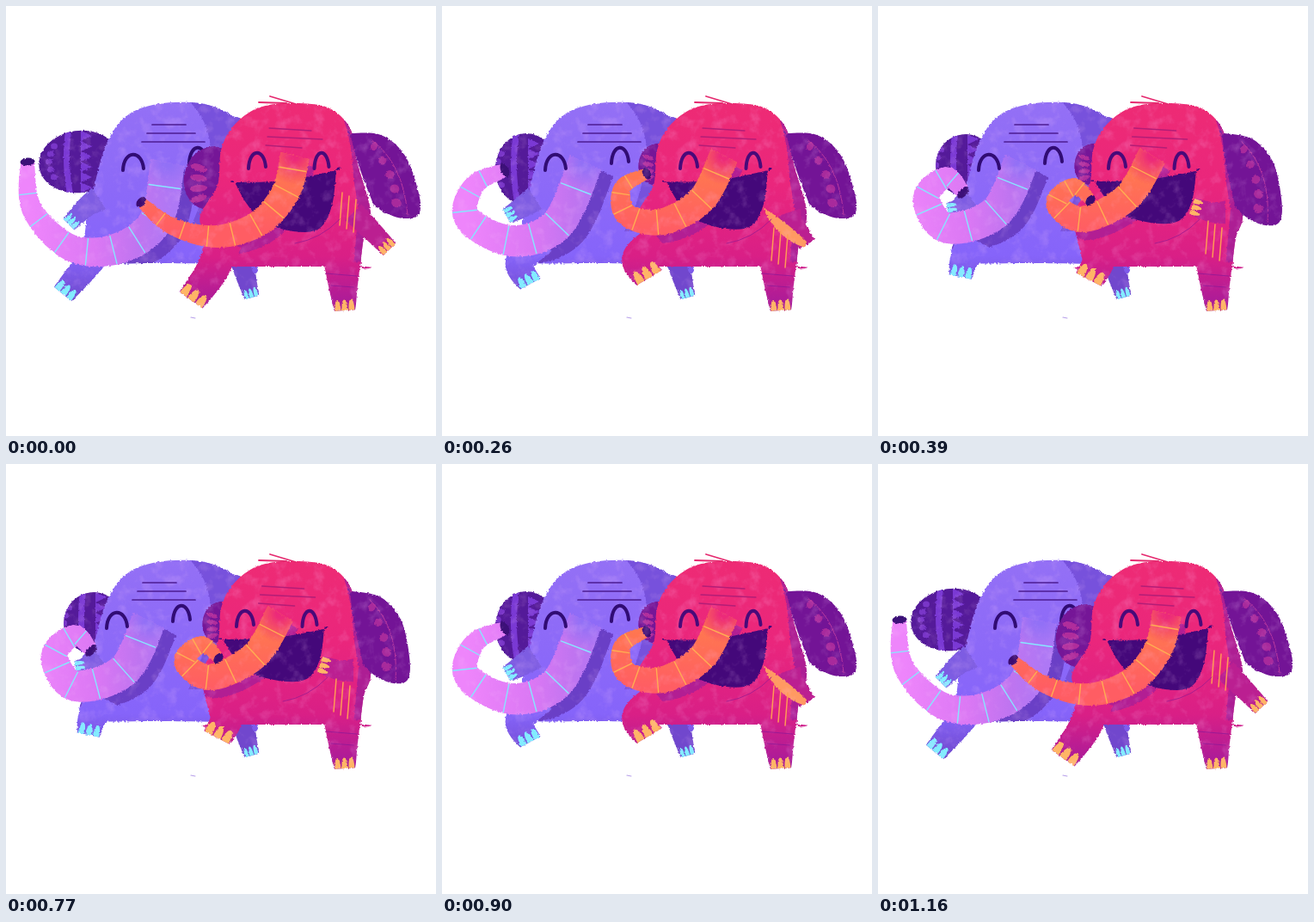
An HTML page for the animation above (1410 ms loop, 500 by 500 pixels).

```html
<!DOCTYPE html>
<html lang="en">
<head>
<meta charset="utf-8">
<title>Dancing elephants</title>
<style>
  html, body { margin: 0; width: 100%; height: 100%; overflow: hidden; background: #fff; }
  svg { display: block; width: 100%; height: 100%; }
</style>
</head>
<body>
<svg viewBox="0 0 500 500">
  <defs>
    <filter id="brush" filterUnits="userSpaceOnUse" x="0" y="0" width="500" height="500" color-interpolation-filters="sRGB">
      <feTurbulence type="fractalNoise" baseFrequency=".4" numOctaves="2" seed="4"/>
      <feColorMatrix values="1 0 0 0 0  0 1 0 0 0  0 0 1 0 0  0 0 0 0 1" result="grain"/>
      <feDisplacementMap in="SourceGraphic" in2="grain" scale="3" xChannelSelector="R" yChannelSelector="G" result="rough"/>
      <feTurbulence type="fractalNoise" baseFrequency=".07" numOctaves="4" seed="9"/>
      <feColorMatrix values="0 0 0 0 1  0 0 0 0 .8  0 0 0 0 1  .5 0 0 0 -.25"/>
      <feComposite in2="rough" operator="in" result="cloud"/>
      <feMerge><feMergeNode in="rough"/><feMergeNode in="cloud"/></feMerge>
    </filter>
    <linearGradient id="violet" gradientUnits="userSpaceOnUse" x1="0" y1="110" x2="0" y2="350">
      <stop offset="0" stop-color="#9470f5"/><stop offset=".75" stop-color="#8664fa"/><stop offset="1" stop-color="#6c45c6"/>
    </linearGradient>
    <linearGradient id="red" gradientUnits="userSpaceOnUse" x1="0" y1="110" x2="0" y2="352">
      <stop offset="0" stop-color="#ee2b74"/><stop offset=".4" stop-color="#ea267c"/>
      <stop offset=".75" stop-color="#d91f86"/><stop offset="1" stop-color="#a51b9b"/>
    </linearGradient>
    <linearGradient id="pink" gradientUnits="userSpaceOnUse" x1="30" y1="0" x2="195" y2="0">
      <stop offset="0" stop-color="#ee85fb"/><stop offset=".45" stop-color="#db78f4"/>
      <stop offset=".75" stop-color="#bf74f0"/><stop offset="1" stop-color="#ae78f5"/>
    </linearGradient>
    <linearGradient id="coral" gradientUnits="userSpaceOnUse" x1="0" y1="180" x2="0" y2="260">
      <stop offset="0" stop-color="#ff7c4c"/><stop offset="1" stop-color="#ff5d63"/>
    </linearGradient>
  </defs>
  <g id="stage"></g>
</svg>
<script>
// Trunks run from tip to base, limbs are knee and foot, ears are centre, radii and turn.
const OUT = {
  violet: {
    face: 0, brow: 0, ear: [85, 181, 47, 36, -8],
    trunk: [[25, 181], [30, 236], [75, 281], [130, 282], [174, 250], [188, 182]],
    leg: [[95, 300], [66, 335]], arm: [[93, 234], [73, 254]]
  },
  red: {
    face: 0, open: 1, lean: 0, swing: 0, marks: [391, 217], ear: [238, 200], earSize: 1,
    trunk: [[157, 228], [193, 256], [245, 268], [295, 252], [326, 215], [336, 174]],
    leg: [[238, 310], [215, 342]], arm: [[426, 262], [446, 283]], palm: 0
  }
};
const LOOP = {
  violet: {
    face: -16, brow: 0, ear: [98, 190, 36, 42, 0],
    trunk: [[73, 191], [38, 208], [29, 246], [80, 273], [134, 254], [167, 182]],
    leg: [[90, 299], [103, 323]], arm: [[90, 236], [75, 244]]
  },
  red: {
    face: -5, open: .95, lean: 0, swing: 0, marks: [386, 258], ear: [249, 184], earSize: .66,
    trunk: [[238, 195], [210, 211], [214, 242], [255, 251], [302, 225], [328, 174]],
    leg: [[228, 294], [241, 316]], arm: [[408, 252], [425, 277]], palm: 1
  }
};
const CURL = {
  violet: {
    face: -19, brow: -11, ear: [102, 185, 35, 36, 0],
    trunk: [[99, 217], [80, 199], [56, 223], [80, 258], [137, 240], [166, 182]],
    leg: [[100, 296], [96, 315]], arm: [[93, 236], [81, 238]]
  },
  red: {
    face: -14, open: .85, lean: 0, swing: 8, marks: [384, 250], ear: [249, 184], earSize: .66,
    trunk: [[247, 226], [228, 210], [208, 229], [238, 248], [290, 222], [319, 174]],
    leg: [[256, 297], [245, 318]], arm: [[389, 240], [365, 233]], palm: 0
  }
};
const HUG = {
  violet: {
    face: -26, brow: -22, ear: [100, 188, 36, 36, 20],
    trunk: [[91, 199], [70, 179], [44, 208], [76, 242], [132, 222], [166, 172]],
    leg: [[115, 311], [128, 351]], arm: [[95, 240], [85, 244]]
  },
  red: {
    face: -24, open: .82, lean: 17, swing: 25, marks: [386, 252], ear: [262, 184], earSize: .4,
    trunk: [[237, 210], [220, 185], [201, 206], [233, 232], [284, 212], [312, 169]],
    leg: [[249, 310], [254, 353]], arm: [[379, 228], [358, 222]], palm: 0
  }
};

const mix = (a, b) => typeof a === "number" ? (a + b) / 2
  : Array.isArray(a) ? a.map((v, i) => mix(v, b[i]))
  : Object.fromEntries(Object.keys(a).map(k => [k, mix(a[k], b[k])]));

// Halfway pose: trunk tips travel on an outward arc instead of a straight line.
const SWING = mix(OUT, LOOP);
SWING.red.palm = 0;
for (const who of [SWING.violet, SWING.red])
  who.trunk = who.trunk.map(([x, y], i) => [x - 14 * (1 - i / 5), y]);

const range = n => [...Array(n).keys()];
const points = s => s.split(", ").map(p => p.split(" ").map(Number));
const path = (d, fill, more = "") => `<path d="${d}" fill="${fill}" ${more}/>`;
const line = (d, color, w) => path(d, "none", `stroke="${color}" stroke-width="${w}" stroke-linecap="round"`);
const ellipse = (x, y, rx, ry, fill, turn = 0) =>
  `<ellipse rx="${rx}" ry="${ry}" fill="${fill}" transform="translate(${x} ${y}) rotate(${turn})"/>`;
const rough = s => `<g filter="url(#brush)">${s}</g>`;
const clipped = (id, s) => `<g clip-path="url(#${id})">${s}</g>`;
const clip = (id, s) => `<clipPath id="${id}">${s}</clipPath>`;

// Smooth closed outline; a doubled point makes a corner.
function blob(p) {
  const at = i => p[(i + p.length) % p.length];
  return "M" + p[0] + p.map((q, i) => {
    const o = at(i - 1), r = at(i + 1), s = at(i + 2);
    return `C${q.map((v, k) => v + (r[k] - o[k]) / 6)} ${r.map((v, k) => v - (s[k] - q[k]) / 6)} ${r}`;
  }).join("") + "Z";
}

// Place and normal on a smooth line through p, u from 0 to 1.
function along(p, u) {
  const t = u * (p.length - 1), i = Math.min(Math.floor(t), p.length - 2), f = t - i;
  const [a, b, c, d] = [-1, 0, 1, 2].map(k => p[Math.max(0, Math.min(p.length - 1, i + k))]);
  const terms = k => [c[k] - a[k], 2 * a[k] - 5 * b[k] + 4 * c[k] - d[k], 3 * (b[k] - c[k]) + d[k] - a[k]];
  const place = k => { const [m, n, o] = terms(k); return b[k] + f * (m + f * (n + f * o)) / 2; };
  const slope = k => { const [m, n, o] = terms(k); return (m + f * (2 * n + 3 * f * o)) / 2; };
  const dx = slope(0), dy = slope(1), len = Math.hypot(dx, dy) || 1;
  return { x: place(0), y: place(1), nx: -dy / len, ny: dx / len };
}

const offset = (q, s) => `${(q.x + s * q.nx).toFixed(1)} ${(q.y + s * q.ny).toFixed(1)}`;

function ribbon(p, width, from = 0) {
  const us = range(41).map(i => from + (1 - from) * i / 40);
  const edge = s => us.map(u => offset(along(p, u), s * width(u) / 2));
  return "M" + [...edge(1), ...edge(-1).reverse()].join("L") + "Z";
}

const taper = (tip, base) => u => tip + (base - tip) * (1 - (1 - u) ** 2);

// Limb with toenails spread along its flat end.
function limb(p, w0, w1, fill, nail, toes = 3) {
  const end = along(p, 1), step = w1 / toes, turn = Math.atan2(end.ny, end.nx) * 180 / Math.PI - 180;
  return path(ribbon(p, u => w0 + (w1 - w0) * u), fill) + range(toes).map(i =>
    path("M-.43 0C-.43-1-.2-1.4 0-1.4S.43-1 .43 0Z", nail,
      `transform="translate(${offset(end, (i - (toes - 1) / 2) * step)}) rotate(${turn}) scale(${step} ${5 + step * .5})"`)).join("");
}

function trunk(p, width, fill, skin, dark, id) {
  const tip = along(p, 0), [bx, by] = p[p.length - 1];
  return `<radialGradient id="${id}" gradientUnits="userSpaceOnUse" cx="${bx}" cy="${by}" r="34">
    <stop offset=".15" stop-color="${skin}"/><stop offset="1" stop-color="${skin}" stop-opacity="0"/></radialGradient>` +
    path(ribbon(p, width), fill) + path(ribbon(p, width, .7), `url(#${id})`) +
    ellipse(tip.x, tip.y, width(0) / 2 + 1, 4.5, dark, Math.atan2(tip.ny, tip.nx) * 180 / Math.PI);
}

const rings = (p, width, color) => range(8).map(i => {
  const u = .14 + i * .11, q = along(p, u), w = width(u) * .46;
  return line(`M${offset(q, w)}L${offset(q, -w)}`, color, 1.4);
}).join("");

const shadow = (p, width, color, id, dx, dy) =>
  clipped(id, path(ribbon(p, width, .35), color, `transform="translate(${dx} ${dy})"`));

const eye = (x, y, r, color) =>
  line(`M${x - r} ${y + 9}C${x - r + 1} ${y - 15} ${x + r - 2} ${y - 15} ${x + r} ${y + 7}`, color, 4);

const VIOLET_BODY = points("92 296, 92 262, 102 212, 117 160, 140 128, 176 114, 225 113, 262 127, 276 150, 285 300, 285 300, 180 299");
const RED_BODY = points("226 243, 246 208, 250 168, 264 140, 292 119, 330 113, 374 118, 400 142, 408 180, 424 240, 416 270, 412 303, 412 303, 240 303, 240 303, 230 264");
const RED_EAR = points("400 148, 400 148, 436 150, 464 174, 480 218, 480 242, 462 247, 440 240, 427 230, 427 230, 410 185");
const MOUTH = points("266 205, 266 205, 325 203, 384 191, 384 191, 379 232, 364 259, 334 262, 300 251, 280 230");

const pinkWidth = taper(15, 40), coralWidth = taper(12, 34);
const CYAN = "#83ecff", PEACH = "#ffb566";

function violetEar([x, y, rx, ry, turn]) {
  const shape = ellipse(x, y, rx, ry, "#541a99", turn);
  const dots = range(5).map(i => ellipse(x - 29 - 6 * Math.sin(i / 4 * Math.PI), y - 18 + 9 * i, 4, 3.5, "#7936c8")).join("");
  const teeth = range(6).map(i => path(`M${x + 2} ${y - 36 + 12 * i}l13 6-13 6Z`, "#7a39d4")).join("");
  return clip("vEar", shape) + shape +
    clipped("vEar", dots + line(`M${x - 12} ${y - 40}q-6 40 2 80`, "#7a39d4", 7) + teeth);
}

function violetElephant({ face, brow, ear, trunk: nose, leg, arm }) {
  const body = path(blob(VIOLET_BODY), "url(#violet)");
  const fills = violetEar(ear) +
    limb([[275, 298], [280, 318], [286, 339]], 28, 17, "#7147cd", CYAN) + body +
    clipped("vBody", path("M206 105Q234 126 238 165Q236 215 212 262H300V105Z", "#7751dc")) +
    shadow(nose, pinkWidth, "#6a3fc6", "vBody", 14, 8) +
    limb([[112, 272], ...leg], 40, 26, "url(#violet)", CYAN) +
    limb([[108, 224], ...arm], 30, 18, "#7d5ce2", CYAN) +
    trunk(nose, pinkWidth, "url(#pink)", "#9270f6", "#3c1078", "vFade");
  return clip("vBody", body) + rough(fills) + rings(nose, pinkWidth, "#87e6ff") +
    range(3).map(i => line(`M${170 - 6 * i + brow} ${138 + 10 * i}H${209 + 11 * i + brow}`, "#4c1d92", 1.7)).join("") +
    eye(148 + face, 182, 12, "#310c74") + eye(223 + face, 174, 10, "#310c74");
}

function redEars([x, y], size, swing) {
  const leaves = range(4).map(i => ellipse(x - 14 * size, y + (12 * i - 12) * size, 10 * size, 4 * size, "#b02d9c", 20 - 12 * i)).join("");
  const dots = range(5).map(i => ellipse(428 + 26 * Math.sin(i * .39), 163 + 16.5 * i, 4 + i / 2, 5, "#a82a9c", 20)).join("");
  return {
    left: ellipse(x, y, 31 * size, 37 * size, "#751697", 15) + leaves,
    right: `<g transform="rotate(${swing} 402 148)">${path(blob(RED_EAR), "#731496")}${dots}` +
      line("M424 155Q462 182 467 243", "#b8379f", 1) + "</g>"
  };
}

function redElephant({ face, open, lean, swing, marks: [mx, my], ear, earSize, trunk: nose, leg, arm, palm }) {
  const sway = y => lean * Math.max(0, 1 - y / 300);
  const body = path(blob(RED_BODY.map(([x, y]) => [x + sway(y), y])), "url(#red)");
  const mouth = MOUTH.map(([x, y]) => [x + face, 198 + (y - 198) * open]);
  const ears = redEars(ear, earSize, swing), brow = face * .6 + sway(150), hair = sway(110);
  const hand = limb([[404, 240], ...arm], 27, 20, "#bb1f91", PEACH, palm ? 0 : 3);
  const fills = ears.left + body +
    clipped("rBody", path("M380 105Q402 140 404 200L410 236L404 303H440V105Z", "#a01d99", 'opacity=".8"')) +
    shadow(nose, coralWidth, "#b21e93", "rBody", 6, 9) +
    limb([[391, 298], [392, 325], [394, 354]], 44, 24, "url(#red)", PEACH) +
    limb([[254, 273], ...leg], 42, 33, "url(#red)", PEACH) +
    path(blob(mouth), "#44087a") + hand + ears.right +
    (palm ? hand + path("M373 234Q402 252 424 274L422 281Q388 270 373 234Z", "#ff9a62") : "") +
    trunk(nose, coralWidth, "url(#coral)", "#ec2a79", "#3b0b70", "rFade");
  return clip("rBody", body) + rough(fills) + rings(nose, coralWidth, "#ffad52") +
    line(`M${294 + hair} 112L${326 + hair} 113M${307 + hair} 105L${337 + hair} 114`, "#e5296f", 1.8) +
    range(3).map(i => line(`M${306 - 2 * i + brow} ${142 + 10 * i}l${[49, 64, 42][i]} 3`, "#b31d77", 1.3)).join("") +
    range(3).map(i => line(`M${mx + 8 * i} ${my + 4 * i}l-3 38`, "#ff9b55", 1.5)).join("") +
    line("M372 311L408 314M378 325L404 327", "#8e1997", .8) +
    line(`M${336 + face} 276Q${366 + face} 271 ${388 + face} 248`, "#a91d8e", 1) +
    eye(292 + face, 180, 10, "#480a79") + eye(367 + face, 180, 8.5, "#480a79");
}

// Out, in to the hug and back again; the two end poses are held longer.
const PERIOD = 1410, BEAT = 130, HOLD = 250;
const poses = [OUT, SWING, LOOP, CURL, HUG, CURL, LOOP, SWING, OUT];
const startOf = i => i * BEAT + (i > 4 ? HOLD - BEAT : 0);
const stage = document.getElementById("stage");
let shown;

function draw(ms) {
  const pose = poses.filter((_, i) => startOf(i) <= ms).pop();
  if (pose === shown) return;
  shown = pose;
  stage.innerHTML = violetElephant(pose.violet) + redElephant(pose.red) + line("M215 362L220 363", "#b7a0ea", 1.2);
}

const begin = performance.now();
function tick() {
  draw((performance.now() - begin) % PERIOD);
  requestAnimationFrame(tick);
}
tick();
</script>
</body>
</html>
```
